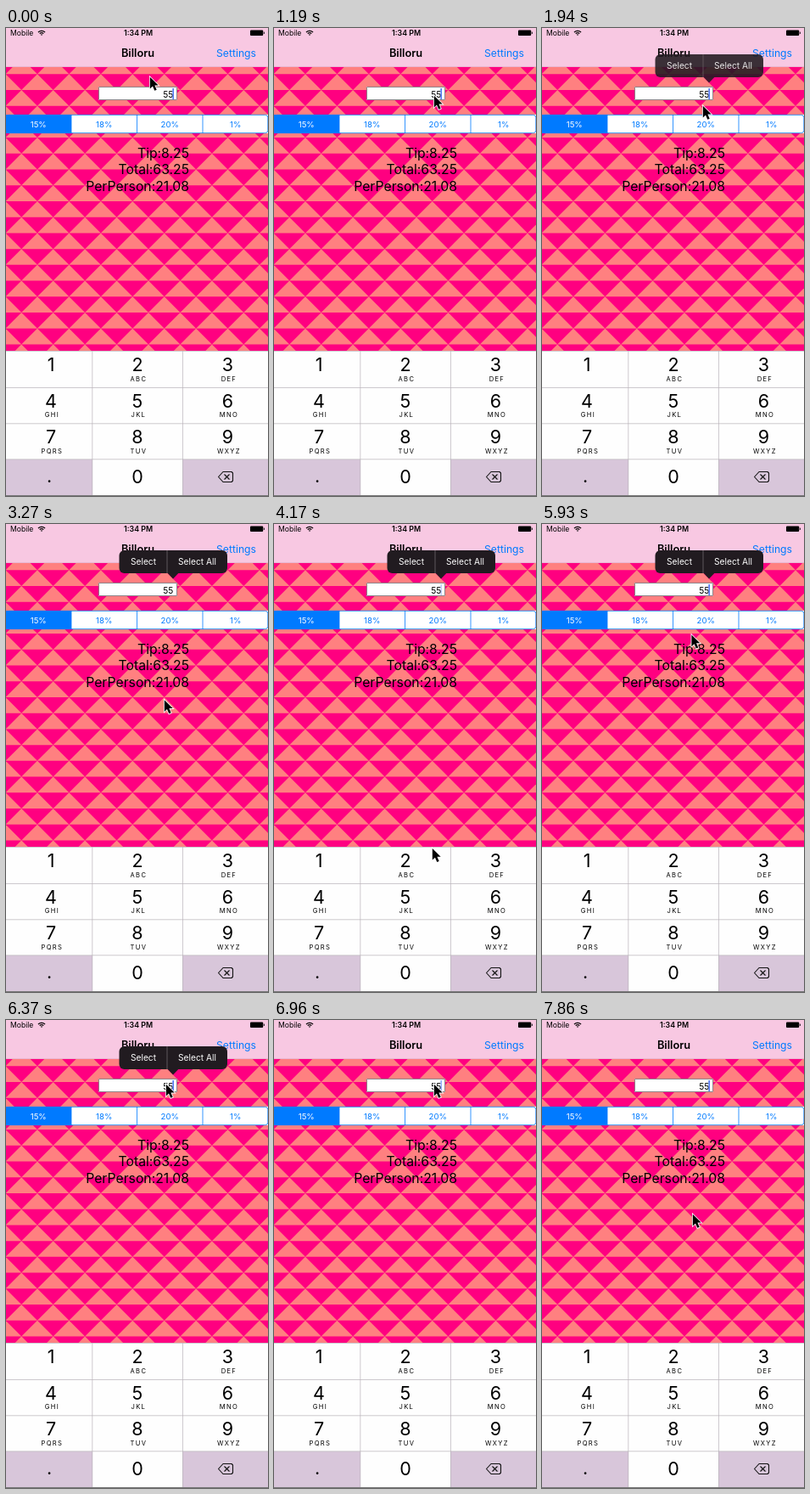
An HTML page with a canvas for the animation above (8 s loop, 309 px wide and 551 px high).

```html
<!DOCTYPE html>
<html lang="en">
<head>
<meta charset="utf-8">
<title>Tip calculator</title>
<style>
  html, body { margin: 0; width: 100%; height: 100%; overflow: hidden; background: #fff; }
  canvas { display: block; width: 309px; height: 551px; }
</style>
</head>
<body>
<canvas id="stage"></canvas>
<script>
const W = 309, H = 551, LOOP = 8000;
const TICK = 147.9; // the screen refreshes once per tick
const BLUE = '#007aff', PINK = '#ff0080', SALMON = '#ff8080', BAR = '#f8c8e2';

const canvas = document.getElementById('stage');
const dpr = window.devicePixelRatio || 1;
canvas.width = W * dpr;
canvas.height = H * dpr;
const ctx = canvas.getContext('2d');

const clamp = v => Math.min(1, Math.max(0, v));

// Pointer strokes in ticks; bx and by bow the path sideways
const REST = { x: 169, y: 57 };
const MOVES = [
  { from: 3, to: 8, x: 188, y: 79, by: 18 },
  { from: 12, to: 13, x: 189, y: 91 },
  { from: 13, to: 16, x: 190, y: 108 },
  { from: 20, to: 21, x: 206, y: 160 },
  { from: 21, to: 23, x: 186, y: 239, bx: -10, by: 7 },
  { from: 26, to: 29, x: 186, y: 212, by: 185 },
  { from: 34, to: 37, x: 157, y: 212, bx: -20 },
  { from: 37, to: 42, x: 188, y: 75 },
  { from: 52, to: 53, x: 177, y: 228 }
];

function pointerAt(n) {
  let pos = REST;
  for (const { from, to, x, y, bx = 0, by = 0 } of MOVES) {
    const p = clamp((n - from) / (to - from));
    const bow = Math.sin(Math.PI * p);
    pos = {
      x: pos.x + (x - pos.x) * p + bx * bow,
      y: pos.y + (y - pos.y) * p + by * bow
    };
  }
  return pos;
}

// The caret stays lit while the field is pressed, then blinks on
function caretAt(n) {
  const second = n >= 42;
  if (second ? n < 46 : n >= 8 && n <= 13) return 1;
  const phase = (n - (second ? 45.5 : 12.85)) / 6.75;
  return clamp(0.3 + 1.8 * Math.cos(2 * Math.PI * phase));
}

function menuAt(n) {
  return n < 13 || n > 43 ? 0 : clamp(0.88 + (n - 13) * 0.12);
}

function rect(x, y, w, h, color) {
  ctx.fillStyle = color;
  ctx.fillRect(x, y, w, h);
}

function text(str, x, y, size, { color = '#000', align = 'center', weight = 400, track = 0 } = {}) {
  ctx.font = `${weight} ${size}px Inter, "Liberation Sans", sans-serif`;
  ctx.letterSpacing = track + 'px';
  ctx.textAlign = align;
  ctx.fillStyle = color;
  ctx.fillText(str, x, y);
}

function poly(points) {
  ctx.beginPath();
  points.forEach(([x, y]) => ctx.lineTo(x, y));
  ctx.closePath();
}

function drawPattern() {
  const row = 18.72, base = row * 2, left = -0.5, top = -1.93;
  rect(0, 46, W, 335, PINK);
  ctx.save();
  ctx.beginPath();
  ctx.rect(0, 46, W, 335);
  ctx.clip();
  ctx.fillStyle = SALMON;
  for (let r = 2; r < 21; r++) {
    const y = top + r * row;
    for (let x = left - (r % 2) * row - row; x < W + base; x += base) {
      poly([[x, y], [x + row, y + row], [x - row, y + row]]);
      ctx.fill();
    }
  }
  ctx.restore();
}

function drawBar() {
  rect(0, 0, W, 46, BAR);
  rect(0, 45.5, W, 0.5, '#d9a3c0');
  text('Mobile', 5, 9, 8.6, { align: 'left' });
  text('1:34 PM', 156, 9, 8.8, { weight: 600 });

  ctx.strokeStyle = '#000';
  ctx.lineWidth = 1.2;
  for (const r of [3.3, 5.7]) {
    ctx.beginPath();
    ctx.arc(42, 9, r, -Math.PI * 0.75, -Math.PI * 0.25);
    ctx.stroke();
  }
  poly([[42, 9], [40.7, 7.5], [43.3, 7.5]]);
  ctx.fillStyle = '#000';
  ctx.fill();

  ctx.beginPath();
  ctx.roundRect(288, 2.5, 15.2, 6.5, 1);
  ctx.fill();
  rect(303.8, 4.6, 1, 2.3, '#000');

  text('Billoru', 155.5, 34, 12.8, { weight: 600 });
  text('Settings', 295, 34, 12.2, { color: BLUE, align: 'right' });
}

function drawForm(caret) {
  rect(109, 69, 93, 16, '#fff');
  ctx.strokeStyle = '#8d8287';
  ctx.lineWidth = 1;
  ctx.strokeRect(109.5, 69.5, 92, 15);
  text('55', 197.3, 81.5, 10.2, { align: 'right' });
  ctx.globalAlpha = caret;
  rect(196.4, 71, 1.5, 13, '#426bf2');
  ctx.globalAlpha = 1;

  const seg = 77.5;
  rect(0, 102, W, 22, '#fff');
  ctx.strokeStyle = BLUE;
  ctx.lineWidth = 0.8;
  ctx.beginPath();
  ctx.roundRect(0.2, 102.4, W - 0.4, 21.2, 3);
  ctx.stroke();
  ['15%', '18%', '20%', '1%'].forEach((label, i) => {
    const x = i * seg - 0.5;
    if (i) rect(x - 0.4, 102, 0.8, 22, BLUE);
    else rect(x, 102, seg, 22, BLUE);
    text(label, x + seg / 2, 116.5, 9.6, { color: i ? BLUE : '#fff' });
  });

  ['Tip:8.25', 'Total:63.25', 'PerPerson:21.08'].forEach((line, i) =>
    text(line, 216, 152.5 + i * 19.8, 15.75, { align: 'right' }));
}

function drawKeys() {
  const letters = ['', 'ABC', 'DEF', 'GHI', 'JKL', 'MNO', 'PQRS', 'TUV', 'WXYZ'];
  const mid = [53, 155, 261.5];
  rect(0, 380, W, 171, '#fefefe');
  rect(0, 508, 102, 43, '#d8c6da');
  rect(208, 508, 101, 43, '#d8c6da');
  for (const y of [380, 423, 465.5, 507.5]) rect(0, y, W, 0.7, '#b9b3ba');
  for (const x of [101.5, 208]) rect(x, 380, 0.7, 171, '#b9b3ba');
  letters.forEach((label, i) => {
    const x = mid[i % 3], y = 380 + Math.floor(i / 3) * 42.5;
    text(String(i + 1), x, y + 24, 21.5);
    text(label, x + 1.4, y + 35.5, 7.6, { track: 1.3 });
  });
  text('0', 155, 535.5, 21.5);
  text('.', 51, 534.5, 21.5);
  rect(0, 550, W, 1, '#777');

  ctx.strokeStyle = '#111';
  ctx.lineWidth = 1.1;
  ctx.lineJoin = 'round';
  poly([[250.5, 528.5], [256, 522.5], [266, 522.5], [267.5, 524], [267.5, 533], [266, 534.5], [256, 534.5]]);
  ctx.stroke();
  ctx.beginPath();
  for (const d of [-1, 1]) {
    ctx.moveTo(257.5, 528.5 - 3 * d);
    ctx.lineTo(263.5, 528.5 + 3 * d);
  }
  ctx.stroke();
}

function drawMenu(alpha) {
  if (!alpha) return;
  ctx.globalAlpha = alpha;
  ctx.fillStyle = '#211b20';
  ctx.beginPath();
  ctx.roundRect(133.5, 31, 127.5, 27, 6);
  ctx.fill();
  poly([[190.5, 57.8], [203.5, 57.8], [197, 64.5]]);
  ctx.fill();
  rect(189.6, 31, 0.8, 27, '#6f666c');
  text('Select', 162, 48, 10.2, { color: '#fff' });
  text('Select All', 225.5, 48, 10.2, { color: '#fff' });
  ctx.globalAlpha = 1;
}

function drawPointer({ x, y }) {
  ctx.save();
  ctx.translate(x + 0.8, y + 0.8);
  ctx.scale(0.93, 0.93);
  poly([[0, 0], [0, 14.6], [3.4, 11.5], [5.9, 17.2], [8.5, 16.1], [6, 10.5], [10.6, 10.5]]);
  ctx.lineJoin = 'miter';
  ctx.lineWidth = 1.8;
  ctx.strokeStyle = '#fff';
  ctx.stroke();
  ctx.fillStyle = '#000';
  ctx.fill();
  ctx.restore();
}

function draw(t) {
  const n = Math.floor(t / TICK);
  ctx.setTransform(dpr, 0, 0, dpr, 0, 0);
  drawPattern();
  drawBar();
  drawForm(caretAt(n));
  drawKeys();
  drawMenu(menuAt(n));
  drawPointer(pointerAt(n));
}

const start = performance.now();
function frame() {
  draw((performance.now() - start) % LOOP);
  requestAnimationFrame(frame);
}
frame();
</script>
</body>
</html>
```
